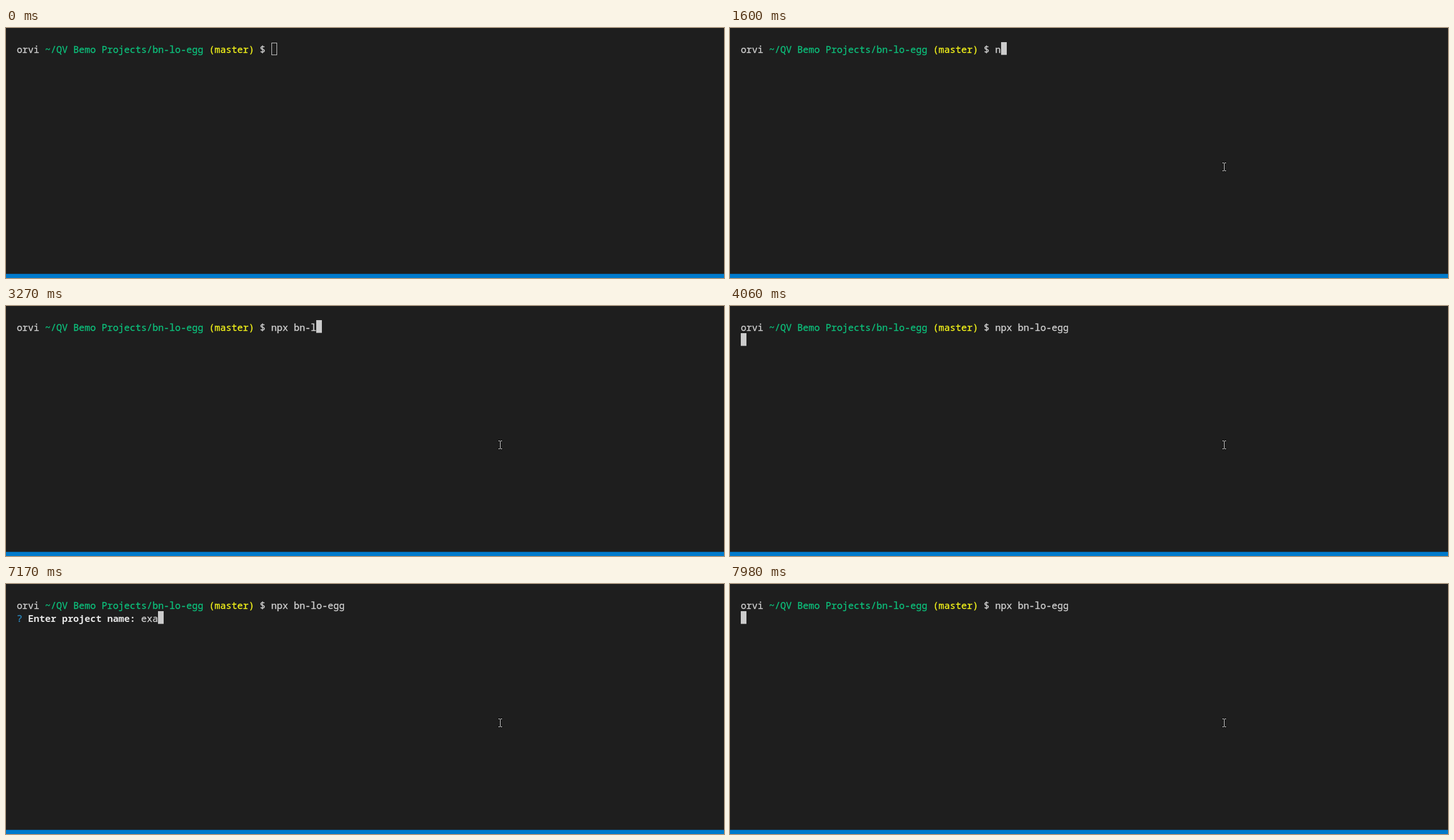
An HTML page with a canvas that plays this animation: 1266x442 px, repeating every 8000 ms.

```html
<!DOCTYPE html>
<html lang="en">
<head>
<meta charset="utf-8">
<title>Terminal</title>
<style>
  html, body { margin: 0; width: 100%; height: 100%; overflow: hidden; background: #1e1e1e; }
  canvas { display: block; }
</style>
</head>
<body>
<canvas id="stage" width="1266" height="442"></canvas>
<script>
const ctx = document.getElementById("stage").getContext("2d");

const LOOP = 8000;
const LEFT = 18.9, CELL = 9.97;
const ROW_TOP = [25, 48], BASELINE = [44, 67];
const FONT = '16.6px "Noto Sans Mono", "DejaVu Sans Mono", monospace';
const COLOR = {
  back: "#1e1e1e", bar: "#007acc", text: "#cccccc", bold: "#e5e5e5",
  path: "#0dbc79", branch: "#f0f01a", mark: "#2a84b8"
};

const APP = "bn-lo-egg";
const COMMAND = "npx " + APP;
const ANSWER = "example-";
const PROMPT = [
  ["orvi ", COLOR.text],
  ["~/QV Bemo Projects/" + APP + " ", COLOR.path],
  ["(master) ", COLOR.branch],
  ["$ ", COLOR.text]
];
const QUESTION = [["? ", COLOR.mark], ["Enter project name: ", COLOR.bold, true]];

// Times of the keystrokes, in ms
const COMMAND_KEYS = [1600, 1870, 2070, 2270, 2540, 2740, 2940, 3270, 3400, 3530, 3730, 3860, 3930];
const ANSWER_KEYS = [6770, 6970, 7170, 7300, 7440, 7640, 7780, 7910];
const FOCUS = 330, ENTER = 4060, ASK = 6310;

// The question row is briefly empty while it is redrawn
const REDRAWS = [[7240, 7300], [7710, 7780], [7980, LOOP]];

// Pointer positions: time, x, y
const POINTER = [[70, 1063, 331], [130, 975, 294], [200, 898, 258], [330, 871, 245]];

const typed = (text, keys, t) => text.slice(0, keys.filter(k => k <= t).length);

// Draws coloured runs on the character grid and returns the next free column
function drawRow(row, runs) {
  let col = 0;
  ctx.lineWidth = 0.35;
  for (const [text, color, bold] of runs) {
    ctx.font = (bold ? "bold " : "") + FONT;
    ctx.fillStyle = ctx.strokeStyle = color;
    for (const ch of text) {
      const x = LEFT + CELL * col++;
      ctx.fillText(ch, x, BASELINE[row]);
      // A hairline gives the regular weight a little more body
      if (!bold) ctx.strokeText(ch, x, BASELINE[row]);
    }
  }
  return col;
}

function drawCursor(row, col, focused) {
  const x = Math.round(LEFT + CELL * col), y = ROW_TOP[row];
  if (focused) {
    ctx.fillStyle = COLOR.text;
    ctx.fillRect(x, y, 10, 22.5);
  } else {
    ctx.strokeStyle = COLOR.text;
    ctx.lineWidth = 1;
    ctx.strokeRect(x + 0.5, y + 1.5, 9, 21);
  }
}

// An I-beam, grown by pad on every side
function drawBeam(x, y, color, pad) {
  const bar = (bx, by, w, h) => ctx.fillRect(bx - pad, by - pad, w + 2 * pad, h + 2 * pad);
  ctx.fillStyle = color;
  bar(x, y - 6, 1, 13);
  for (const end of [y - 7, y + 7]) {
    bar(x - 3, end, 3, 1);
    bar(x + 1, end, 3, 1);
  }
}

function drawPointer(t) {
  const place = POINTER.filter(p => p[0] <= t).pop();
  if (!place) return;
  const [, x, y] = place;
  drawBeam(x, y, "#0c0c0c", 1);
  drawBeam(x, y, "#e6e6e6", 0);
}

function draw(t) {
  ctx.fillStyle = COLOR.back;
  ctx.fillRect(0, 0, 1266, 442);
  ctx.fillStyle = COLOR.bar;
  ctx.fillRect(0, 434.7, 1266, 7.3);

  let row = 0;
  let col = drawRow(0, [...PROMPT, [typed(COMMAND, COMMAND_KEYS, t), COLOR.text]]);
  if (t >= ENTER) {
    row = 1;
    const empty = t < ASK || REDRAWS.some(([from, to]) => t >= from && t < to);
    col = empty ? 0 : drawRow(1, [...QUESTION, [typed(ANSWER, ANSWER_KEYS, t), COLOR.text]]);
  }
  drawCursor(row, col, t >= FOCUS);
  drawPointer(t);
}

function tick() {
  draw(performance.now() % LOOP);
  requestAnimationFrame(tick);
}
tick();
</script>
</body>
</html>
```
